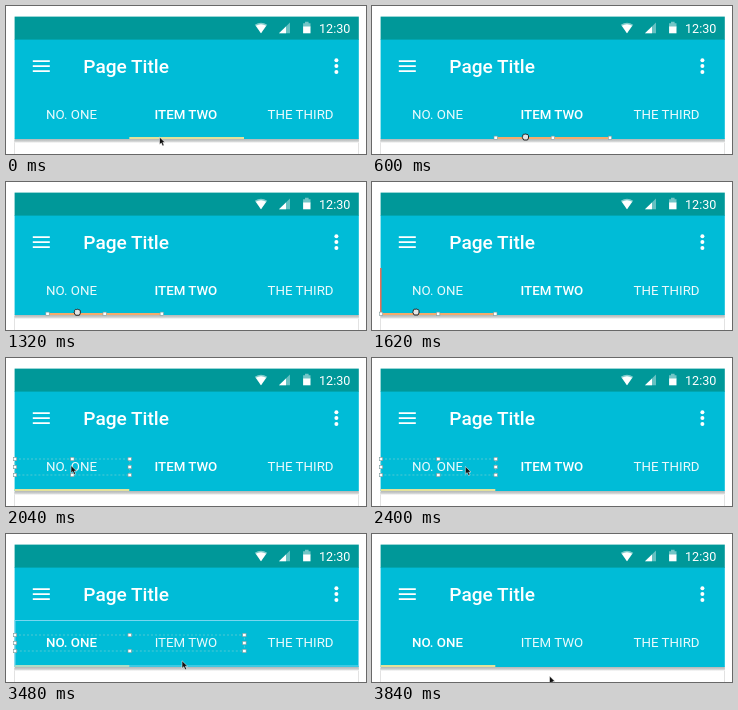
Recreate the animation shown at these times as an HTML page. Size 360 by 148 pixels, loop 4840 ms.

```html
<!DOCTYPE html>
<html lang="en">
<head>
<meta charset="utf-8">
<title>Moving a tab indicator</title>
<style>
  html, body { margin: 0; width: 100%; height: 100%; overflow: hidden; background: #fff; }
  svg { display: block; width: 100vw; height: 100vh; }
  text { font-family: Roboto, sans-serif; fill: #fff; }
  .tab { font-size: 13.3px; fill: #ebfafc; }
  .tab.on { font-weight: 500; fill: #fff; }
  .handle { fill: #fff; stroke: #7d9a9c; stroke-width: .6; }
  .edge { fill: none; stroke: #62cbd2; stroke-width: .8; stroke-dasharray: 2 2; }
</style>
</head>
<body>
<svg viewBox="0 0 360 148">
  <defs>
    <linearGradient id="shade" x2="0" y2="1">
      <stop stop-color="#adb2b2"/>
      <stop offset=".6" stop-color="#cdcfcf"/>
      <stop offset="1" stop-color="#fff"/>
    </linearGradient>
  </defs>
  <rect width="360" height="148" fill="#fff"/>
  <path d="M8.5 134V148M352.5 134V148" stroke="#e2e2e2"/>
  <rect x="8.6" y="132.5" width="344.2" height="4.5" fill="url(#shade)"/>
  <rect x="8.6" y="33" width="344.2" height="100" fill="#00bcd7"/>
  <rect x="8.6" y="10.6" width="344.2" height="23" fill="#009899"/>

  <g fill="#fff">
    <path d="M248.8 18.8Q255 14.6 261.2 18.8L255 27.3Z" opacity=".5"/>
    <path d="M249.9 19.8Q255 16.6 260.1 19.8L255 27.3Z"/>
    <path d="M284 16.5V27.3H273Z" opacity=".4"/>
    <path d="M280 20.5V27.3H273Z"/>
    <path d="M299 15.8h3.6v1.4h1.9v4h-7.4v-4h1.9z" opacity=".45"/>
    <path d="M297.1 20.5h7.4v6.8h-7.4z"/>
    <path d="M26.8 54.2h17v1.9h-17zM26.8 59.2h17v1.9h-17zM26.8 64.2h17v1.9h-17z"/>
    <circle cx="330.4" cy="54.3" r="2"/>
    <circle cx="330.4" cy="60.1" r="2"/>
    <circle cx="330.4" cy="65.9" r="2"/>
  </g>
  <text x="313" y="27" font-size="12.6">12:30</text>
  <text x="77.3" y="67" font-size="19.1" font-weight="500">Page Title</text>
  <text class="tab" id="one" x="65.5" y="113.4" text-anchor="middle">NO. ONE</text>
  <text class="tab" id="two" x="179.9" y="113.4" text-anchor="middle">ITEM TWO</text>
  <text class="tab" x="294.6" y="113.4" text-anchor="middle">THE THIRD</text>

  <path id="guide" d="M8.8 86V132.3H123.5" fill="none" stroke="#f0654a" stroke-width="1.4"/>
  <g id="bar">
    <rect id="line" y="131" width="114.7" height="2"/>
    <g id="grips"></g>
  </g>
  <rect id="hover" x="9" y="86.5" width="343.5" height="45.5" fill="none" stroke="#78d6f0"/>
  <g id="single"></g>
  <g id="pair"></g>

  <g id="cursor">
    <path id="arrow" d="M0 0V7.6L1.8 6L3.1 9L4.6 8.3L3.3 5.5H5.6Z"
      fill="#111" stroke="#fff" stroke-width=".5"/>
    <path id="fist" d="M-2.7 -2Q-2 -3.4 -.8 -2.7Q.3 -3.4 1.3 -2.6Q2.7 -2.9 3 -1.2V1L2 3H-1.8L-3.1 .7Q-3.6 -.6 -2.7 -.7Z"
      fill="#e4e4e4" stroke="#222"/>
  </g>
</svg>
<script>
const LOOP = 4840, STEP = 60, TAB = 114.7, LEFT = 8.6;
const GRAB = 300, RELEASE = 1740, PICK = 1980, ADD = 2700, SWAP = 3240, CLEAR = 3840;
const $ = id => document.getElementById(id);

// Cursor moves: start, end, target x, target y
const moves = [
  [700, 1620, 44, 130],
  [1740, 2040, 65, 107.5],
  [2220, 2760, 174.5, 111.5],
  [3180, 3780, 177.5, 142]
];

const handle = (x, y) =>
  `<rect class="handle" x="${x - 1.7}" y="${y - 1.7}" width="3.4" height="3.4"/>`;
const row = (x, w, y, stops = [0, .5, 1]) =>
  stops.map(k => handle(x + k * w, y)).join('');
const box = w =>
  `<rect class="edge" x="9" y="101" width="${w}" height="16"/>` +
  row(9, w, 101) + row(9, w, 109, [0, 1]) + row(9, w, 117);

$('grips').innerHTML = row(.4, TAB - .4, 131.8);
$('single').innerHTML = box(TAB);
$('pair').innerHTML = box(2 * TAB);

const show = (id, on) => $(id).setAttribute('visibility', on ? 'visible' : 'hidden');
const place = (id, x, y) => $(id).setAttribute('transform', `translate(${x} ${y})`);

function cursorAt(t) {
  let x = 153.5, y = 131;
  for (const [from, to, tx, ty] of moves) {
    const p = Math.min(1, Math.max(0, (t - from) / (to - from)));
    const e = p * p * (3 - 2 * p);
    x += (tx - x) * e;
    y += (ty - y) * e;
  }
  return [x, y];
}

function draw(t) {
  const [x, y] = cursorAt(t);
  const held = t >= GRAB && t < RELEASE;
  const free = LEFT + TAB + x - 153.5;
  const snapped = t >= RELEASE || free < LEFT + 6;
  const selected = t >= GRAB && t < PICK;

  place('bar', snapped ? LEFT : free, 0);
  $('line').setAttribute('fill', selected ? '#f5ab6c' : '#e3e19a');
  show('grips', selected);
  show('guide', held && snapped);
  show('hover', !held && y > 117 && y < 130);
  show('single', t >= PICK && t < ADD);
  show('pair', t >= ADD && t < CLEAR);
  $('one').classList.toggle('on', t >= SWAP);
  $('two').classList.toggle('on', t < SWAP);
  place('cursor', x, y);
  show('arrow', !held);
  show('fist', held);
}

function tick() {
  const t = performance.now() % LOOP;
  draw(Math.min(CLEAR, Math.floor(t / STEP) * STEP));
  requestAnimationFrame(tick);
}
tick();
</script>
</body>
</html>
```
